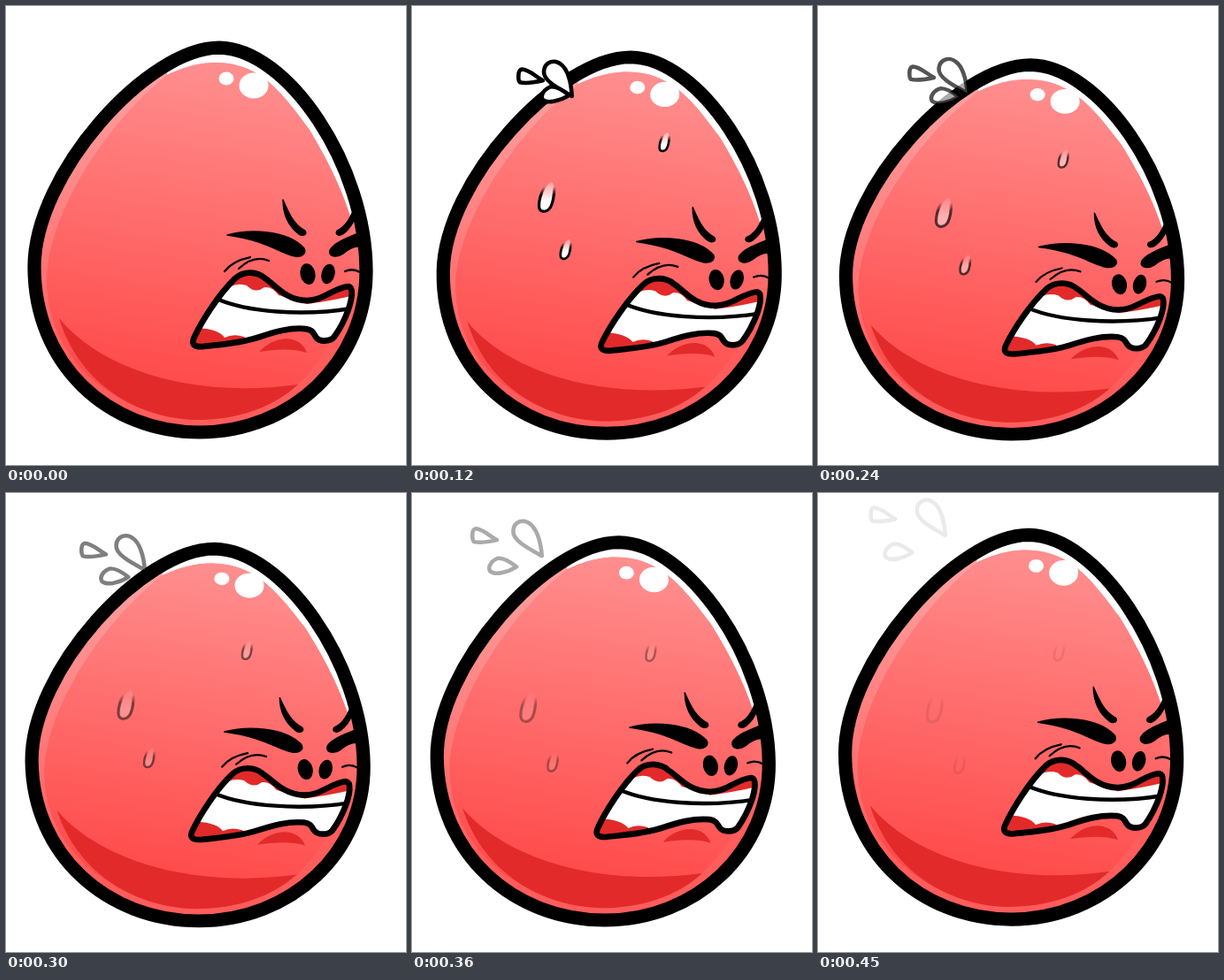
An HTML page with a canvas for the animation above (0.48 s loop, 452 by 519 pixels).

```html
<!DOCTYPE html>
<html lang="en">
<head>
<meta charset="utf-8">
<title>Straining egg</title>
<style>
  html, body { margin: 0; width: 100%; height: 100%; overflow: hidden; background: #fff; }
  canvas { display: block; }
</style>
</head>
<body>
<canvas id="stage" width="452" height="519"></canvas>
<script>
const ctx = document.getElementById('stage').getContext('2d');
const LOOP = 480, STEP = 30;
const INK = '#000', RED = '#e32a2a', WHITE = '#fff';

const shape = d => new Path2D(d);
const TOP_EDGE = 'C207,66 225,64 238,64 C290,64 316,104 343,140 C367,180 381,212 389,238';

const egg = shape('M241,47 C318,48 407,180 407,300 C407,403 322,482 219,482 C115,482 32,405 32,295 C32,190 160,47 241,47Z');
const glare = shape(`M182,78 ${TOP_EDGE} L395,240 L440,240 L440,20 L182,20Z`);
const body = shape(`M46,310 C47,240 107,138 182,78 ${TOP_EDGE} C394,310 382,380 330,428 C295,460 250,468 215,468 C140,466 46,410 46,310Z`);
const shade = shape('M60,353 C105,408 205,445 330,428 C295,460 250,468 215,468 C140,466 80,420 60,353Z');

const mouth = shape('M213,374 C221,357 240,326 259,308 C269,299 284,300 293,308 C304,315 316,333 340,333 C359,333 371,318 387,317 C393,318 391,331 387,343 C382,357 376,367 371,374 C366,380 354,380 350,374 C347,369 346,366 339,365 C321,363 302,369 284,375 C262,382 238,383 223,385 C212,386 209,382 213,374Z');
const teeth = shape('M216,364 L244,325 Q256,311 272,316 Q282,326 292,318 Q301,317 308,327 L340,337 Q364,334 394,327 L390,385 L276,385 L269,374 Q257,370 247,375 Q240,365 216,364Z');
const bite = shape('M238,331 C272,346 335,351 390,342');
const chin = shape('M286,391 C303,372 332,370 340,392 C325,387 305,388 286,391Z');
const brows = shape(
  'M250,259 C275,252 318,253 337,274 C340,280 334,284 327,283 C310,280 295,265 250,259Z' +
  'M400,256 C385,262 370,268 366,276 C364,284 374,285 381,280 C388,274 394,271 401,272Z' +
  'M313,219 C320,235 325,247 338,254 C341,258 336,261 331,258 C318,248 313,235 313,219Z' +
  'M393,230 C388,242 383,250 374,254 C371,259 377,261 382,257 C389,251 392,246 394,240Z');
const wrinkles = shape('M247,300 Q256,288 276,284 M263,297 Q280,281 297,288 M383,300 Q392,296 400,301');

// Drops flying off: outline drawn from its tip, first tip position, total travel.
const flyers = [
  { path: shape('M0,0 C-16,-9 -33,-18 -32,-29 C-31,-40 -20,-43 -13,-37 C-6,-32 -1,-18 0,0Z'), from: [175, 92], move: [-28.5, -44.5] },
  { path: shape('M0,0 C-9,-5 -16,-13 -24,-13 C-29,-12 -28,0 -26,2 C-18,4 -9,2 0,0Z'), from: [142, 74], move: [-52, -45] },
  { path: shape('M0,0 C-6,-5 -14,-10 -20,-10 C-28,-8 -33,0 -30,5 C-25,10 -11,7 0,0Z'), from: [172, 91], move: [-63, -24] },
];

// Drops sliding down the shell, drawn around their centre.
const bead = shape('M6,-18 C0,-17 -8,0 -8,9 C-8,17 0,18 4,11 C8,4 11,-16 6,-18Z');
const beadLine = shape('M-2,-13 C-6,-5 -8,3 -8,9 C-8,17 0,18 5,11 C8,5 9,-4 9,-11');
const sliders = [
  { size: 1, from: [148, 208], move: [-15, 35] },
  { size: .67, from: [170, 268], move: [-9, 38] },
  { size: .64, from: [280, 144], move: [-6, 35] },
];

function gradient(x0, y0, x1, y1, ...colors) {
  const g = ctx.createLinearGradient(x0, y0, x1, y1);
  colors.forEach((c, i) => g.addColorStop(i / (colors.length - 1), c));
  return g;
}
const bodyFill = gradient(260, 60, 200, 430, '#ff9090', '#ff4b4b');
const rimFill = gradient(120, 80, 150, 400, '#ffa0a0', '#ff5c5c');
const beadFill = gradient(0, -18, 0, 4, 'rgba(255,255,255,.3)', '#fff');
const beadInk = gradient(0, -13, 0, -3, 'rgba(0,0,0,0)', INK);

const clamp = v => Math.min(1, Math.max(0, v));
const smooth = v => v * v * (3 - 2 * v);
const fade = t => clamp(1 - (t - 122) * .0028);

function fill(path, color) {
  ctx.fillStyle = color;
  ctx.fill(path);
}
function stroke(path, width, color = INK) {
  ctx.lineWidth = width;
  ctx.strokeStyle = color;
  ctx.stroke(path);
}
function ellipse(x, y, rx, ry, angle, color) {
  ctx.beginPath();
  ctx.ellipse(x, y, rx, ry, angle, 0, Math.PI * 2);
  ctx.fillStyle = color;
  ctx.fill();
}
function placed(x, y, size, draw) {
  ctx.save();
  ctx.translate(x, y);
  ctx.scale(size, size);
  draw();
  ctx.restore();
}

function drawShell() {
  ctx.save();
  ctx.clip(egg);
  fill(egg, rimFill);
  fill(glare, WHITE);
  fill(body, bodyFill);
  fill(shade, RED);
  ellipse(249, 82, 8.5, 7.5, 0, WHITE);
  ellipse(280, 90, 16.5, 14.5, 0, WHITE);
  ctx.restore();
  stroke(egg, 15.2);
}

function drawFace() {
  fill(chin, RED);
  ctx.save();
  ctx.clip(mouth);
  fill(mouth, RED);
  fill(teeth, WHITE);
  stroke(bite, 4.5);
  ctx.restore();
  stroke(mouth, 6.8);
  fill(brows, INK);
  stroke(brows, 1.4);
  ellipse(341, 303, 8.5, 12, -.2, INK);
  ellipse(364, 303, 7.5, 11.5, .25, INK);
  stroke(wrinkles, 2.3);
}

function drawSliders(t) {
  if (t < 30) return;
  const p = smooth(clamp((t - 60) / 390) ** 1.1);
  const alpha = t < 60 ? .5 : fade(t);
  for (const { size, from, move } of sliders) {
    placed(from[0] + move[0] * p, from[1] + move[1] * p, size, () => {
      ctx.globalAlpha = alpha * alpha;
      fill(bead, beadFill);
      ctx.globalAlpha = alpha;
      stroke(beadLine, 3.2 / Math.sqrt(size), beadInk);
    });
  }
}

function drawFlyers(t) {
  if (t < 90) return;
  const n = clamp((t - 120) / 330);
  const px = smooth(n ** 1.25), py = n ** 1.3;
  for (const { path, from, move } of flyers) {
    placed(from[0] + move[0] * px, from[1] + move[1] * py, t < 120 ? .6 : 1, () => {
      ctx.globalAlpha = fade(t);
      fill(path, WHITE);
      stroke(path, 4.6);
    });
  }
}

function render(t) {
  const turn = 2 * Math.PI / LOOP;
  const squash = (1 - Math.cos((t + 8) * turn)) / 2;
  const lean = .0128 * (Math.cos((t - 115) * turn) - .07);

  ctx.setTransform(1, 0, 0, 1, 0, 0);
  ctx.fillStyle = WHITE;
  ctx.fillRect(0, 0, 452, 519);
  ctx.lineCap = ctx.lineJoin = 'round';

  // Squash and shear towards the ground.
  ctx.setTransform(1, 0, -lean, 1 - .0401 * squash, 570 * lean, 21.6 * squash);
  drawShell();
  placed(0, 2.4 * squash, 1, drawFace);
  drawSliders(t);
  drawFlyers(t);
}

function tick() {
  const t = performance.now() % LOOP;
  render(Math.floor(t / STEP) * STEP);
  requestAnimationFrame(tick);
}
tick();
</script>
</body>
</html>
```
